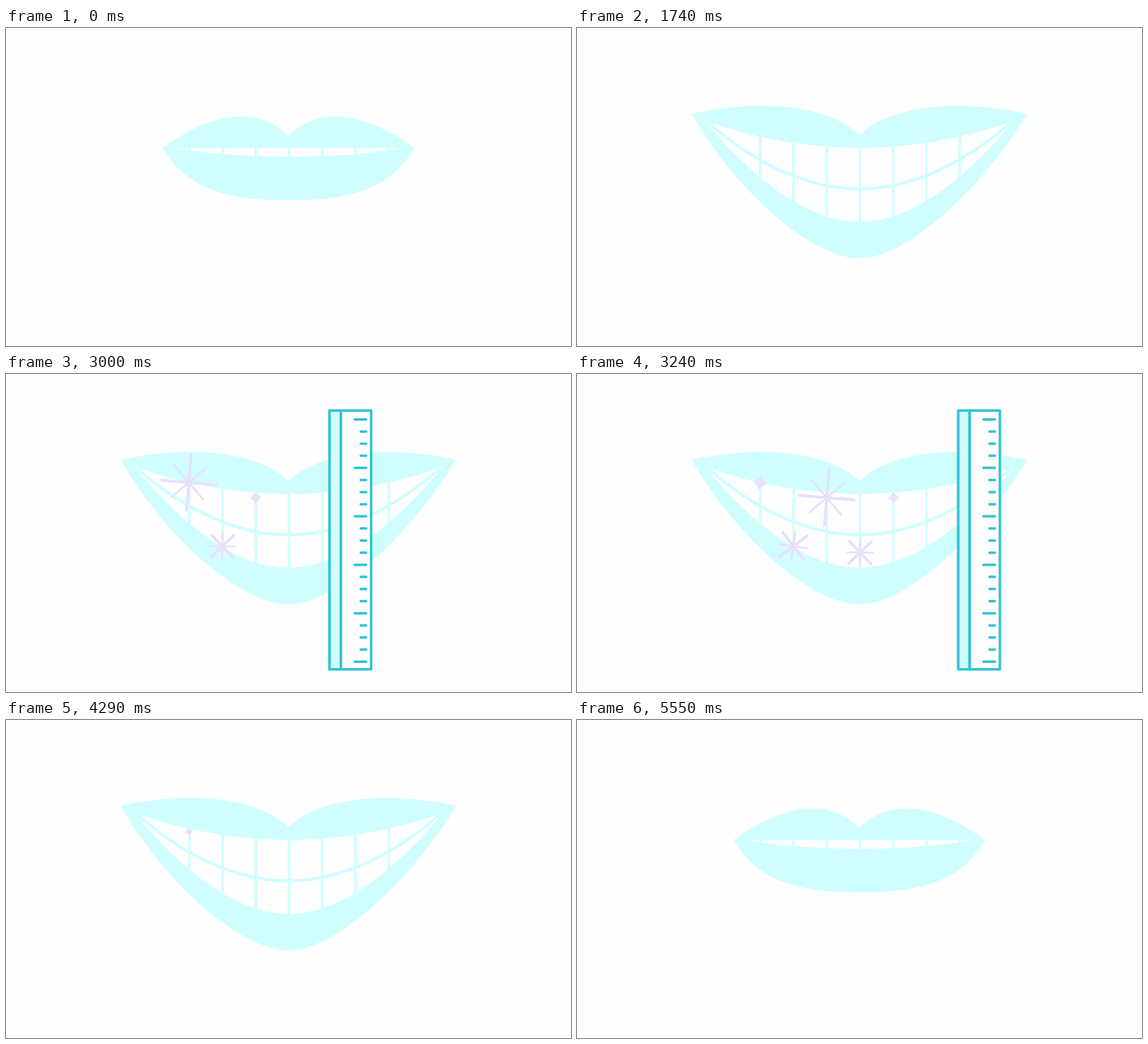
Recreate the animation shown at these times as an HTML page. Size 896 by 504 pixels, loop 5580 ms.

```html
<!DOCTYPE html>
<html lang="en">
<head>
<meta charset="utf-8">
<title>Smile</title>
<style>
  html, body { margin: 0; width: 100%; height: 100%; overflow: hidden; background: #fefefe; }
  svg { display: block; width: 100vw; height: 100vh; }
  .line { fill: none; stroke: #d0feff; }
  .ruler { stroke: #34c3d3; stroke-width: 4; stroke-linecap: round; stroke-linejoin: round; }
  .star path { fill: none; stroke: #e8e0fd; stroke-linecap: round; vector-effect: non-scaling-stroke; }
</style>
</head>
<body>
<svg viewBox="0 0 896 504">
  <defs><clipPath id="opening"><path id="inner"/></clipPath></defs>
  <path id="lips" fill="#d0feff"/>
  <g clip-path="url(#opening)">
    <rect width="896" height="504" fill="#fefefe"/>
    <path id="gaps" class="line" stroke-width="4"/>
    <path class="line" stroke-width="5" d="M207 149C275 209 360 255 448 255S621 209 689 149"/>
  </g>
  <g id="stars"></g>
  <g id="ruler" class="ruler">
    <rect x="-33" y="-412" width="66" height="410" fill="#fefefe"/>
    <path d="M-33-412h18v410h-18z" fill="#d0feff"/>
    <path id="ticks" fill="none"/>
  </g>
</svg>
<script>
const LOOP = 5580;
const CENTER = 448;
const $ = id => document.getElementById(id);
const repeat = (count, make) => Array.from({ length: count }, (_, i) => make(i));
const clamp = u => Math.min(1, Math.max(0, u));
const smooth = u => u * u * (3 - 2 * u);

// Rises past 1, settles, and plays the same motion backwards before `off`.
function swell(t, { on, off, rise, settle, peak }) {
  const d = Math.min(t - on, off - t);
  return d < rise ? peak * smooth(clamp(d / rise))
                  : peak + (1 - peak) * smooth(clamp((d - rise) / settle));
}

// Cubic easing with handles (.33, 0) and (.3, 1), solved by bisection.
function glide(u) {
  let lo = 0, hi = 1;
  for (let i = 0; i < 24; i++) {
    const s = (lo + hi) / 2, r = 1 - s;
    if (.99 * s * r * r + .9 * s * s * r + s * s * s < u) lo = s; else hi = s;
  }
  return smooth(lo);
}

// Two mirrored curves from one mouth corner to the other; side is -1 when starting at the left.
function arc(side, width, cornerY, far, farY, near, nearY, middleY, tuck = 1) {
  const point = (s, reach, y) => `${CENTER + s * width * reach * (s > 0 && reach < 1 ? tuck : 1)} ${y} `;
  return `C${point(side, far, farY)}${point(side, near, nearY)}${CENTER} ${middleY}` +
         `C${point(-side, near, nearY)}${point(-side, far, farY)}${point(-side, 1, cornerY)}`;
}

function drawMouth(amount) {
  const y = (shut, open) => shut + (open - shut) * amount;
  const x = (shut, open) => shut + (open - shut) * Math.min(amount, 1);

  const width = x(199.5, 266), corner = y(190, 136);
  $('lips').setAttribute('d', `M${CENTER - width} ${corner}` +
    arc(-1, width, corner, x(.74, .594), y(152, 112), x(.31, .18), y(110, 122), y(171, 170)) +
    arc(1, width, corner, x(.8, .76), y(260, 250), x(.44, .3), y(273, 365), y(273, 365), x(1, .975)));

  const gap = x(178, 245), gapCorner = y(190.5, 147);
  $('inner').setAttribute('d', `M${CENTER - gap} ${gapCorner}` +
    arc(-1, gap, gapCorner, .72, y(190.5, 172), .36, 190, 190) +
    arc(1, gap, gapCorner, .72, y(200, 230), .36, y(204, 307), y(204, 307)));
}

function drawRuler(t) {
  const scale = swell(t, RULER);
  const x = CENTER - 2 + 420 * (glide(clamp((t - 2550) / 900)) - .5);
  $('ruler').style.display = scale > .002 ? '' : 'none';
  $('ruler').setAttribute('transform', `translate(${x} 470) scale(${scale})`);
}

function drawStar({ x, y, start, node }, t) {
  const u = (t - start) / 570;
  const size = 1 - Math.abs(2 * u - 1);
  node.style.display = size > .01 ? '' : 'none';
  if (size > .01) {
    node.setAttribute('transform', `translate(${x} ${y}) rotate(${230 * u - 17}) scale(${size})`);
  }
}

const MOUTH = { on: 870, off: 5365, rise: 420, settle: 90, peak: 1.09 };
const RULER = { on: 1765, off: 4170, rise: 495, settle: 85, peak: 1.053 };

// Stars alternate between the upper and lower gum line, following the ruler.
const stars = repeat(7, i => {
  const k = i - 3;
  return { x: CENTER + 1 + 53 * k, y: i % 2 ? 283 - 2.5 * k * k : 199 - 3 * k * k, start: 2724 + 120 * i };
});
stars.push({ x: 290, y: 177, start: 4270 });

for (const star of stars) {
  $('stars').insertAdjacentHTML('beforeend',
    `<g class="star"><path stroke-width="4.6" d="M-45 0H45M0-45V45"/>
     <path stroke-width="3.2" d="M-26-26L26 26M26-26L-26 26"/></g>`);
  star.node = $('stars').lastElementChild;
}

$('gaps').setAttribute('d', repeat(7, i => `M${290.7 + 52.7 * i} 140V330`).join(''));
$('ticks').setAttribute('d', 'M-15-412v410' +
  repeat(21, i => `M${i % 4 ? 16.5 : 7} ${-398 + 19.2 * i}H25`).join(''));

function draw(t) {
  drawMouth(swell(t, MOUTH));
  drawRuler(t);
  for (const star of stars) drawStar(star, t);
}

const began = performance.now();
function tick() {
  draw((performance.now() - began) % LOOP);
  requestAnimationFrame(tick);
}
tick();
</script>
</body>
</html>
```
